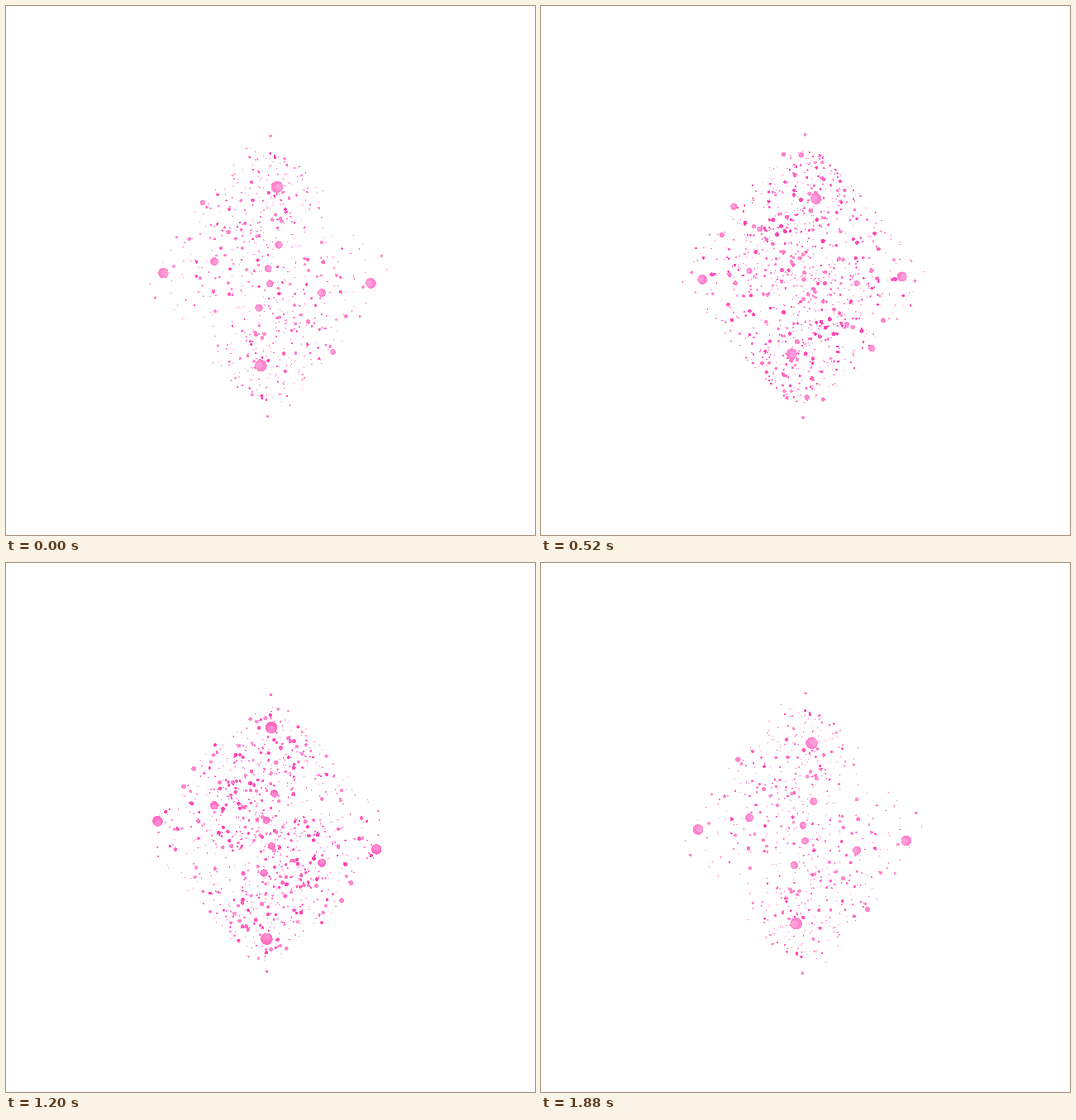
Animation, 640 px wide and 640 px high, one loop 1.92 s. Source, as an HTML page with a canvas:

```html
<!DOCTYPE html>
<html lang="en">
<head>
<meta charset="utf-8">
<title>Pink dust diamond</title>
<style>
  html, body { margin: 0; width: 100%; height: 100%; overflow: hidden; background: #fff; }
  canvas { display: block; width: 640px; height: 640px; }
</style>
</head>
<body>
<canvas id="stage" width="640" height="640"></canvas>
<script>
const ctx = document.getElementById('stage').getContext('2d');
const LOOP = 1920, STEP = 40, TAU = Math.PI * 2;
const CX = 317.4, CY = 327.6;
const LIGHT = [255, 143, 209], DEEP = [255, 66, 178], PALE = [255, 166, 222];

// A ball glides from one point to another, swelling and shrinking on the way.
// A life may run past the end of the loop, so two lives can overlap.
const ball = (birth, life, from, to, size) => ({ birth, life, from, to, size });
const balls = [
  ball(1740, 1760, [326, 254], [327, 238], 3),
  ball(1700, 1800, [223, 284], [213, 267], 3),
  ball(1700, 1600, [271, 275], [257, 264], 3.4),
  ball(760, 2240, [321, 161], [319, 154], 1.8),
  ball(400, 2200, [313, 304], [319, 324], 4.4),
  ball(640, 1780, [320, 271], [334, 296], 4.6),
  ball(1700, 1560, [240, 236], [226, 250], 4.2),
  ball(600, 2040, [252, 280], [252, 325], 5),
  ball(640, 2280, [178, 304], [200, 338], 6.3),
  ball(440, 2460, [314, 178], [337, 246], 7.2)
];

let seed = 20417;
function rand() {
  seed = (seed + 0x6D2B79F5) | 0;
  let n = Math.imul(seed ^ (seed >>> 15), 1 | seed);
  n = (n + Math.imul(n ^ (n >>> 7), 61 | n)) ^ n;
  return ((n ^ (n >>> 14)) >>> 0) / 4294967296;
}

const hump = (x, y, mx, my, s) => Math.exp(-((x - mx) ** 2 + (y - my) ** 2) / (2 * s * s));

// Upper half of the cloud; the lower half is its mirror through the centre.
function density(x, y) {
  const ax = Math.abs(x), ay = Math.abs(y);
  if (ax / 154 + ay / 168 > 1.04 || ay > 150) return 0;
  const band = .14 + .42 * Math.exp(-((x / 70) ** 2));
  const clumps = .22 * hump(x, y, 0, 0, 40) + .32 * hump(x, y, 46, -92, 24)
    + .22 * hump(x, y, -55, -58, 30);
  return (band + clumps) * (1 - .65 * hump(x, y, 60, -45, 20));
}

function makeMote() {
  let x, y;
  do {
    x = (rand() * 2 - 1) * 158;
    y = -rand() * 160;
  } while (rand() > density(x, y));
  const inward = rand() < (Math.abs(x) > 70 ? .15 : .5);
  return {
    x, y,
    vx: inward ? -.045 * x - .06 * y : .075 * x,
    vy: inward ? -.075 * x - .165 * y : .06 * x + .1 * y,
    size: .6 + 1.8 * rand() ** 2.6,
    peak: rand() < .45 ? .42 + (rand() - .5) * .4 : rand(),
    tone: rand() * TAU,
    turns: 1 + Math.floor(rand() * 3)
  };
}
const motes = Array.from({ length: 690 }, makeMote);

const lerp = (a, b, k) => a + (b - a) * k;
const mix = (a, b, k) => `rgb(${a.map((v, i) => Math.round(lerp(v, b[i], k)))})`;

// Hard-edged disc built from pixel rows.
function disc(x, y, r, color) {
  ctx.fillStyle = color;
  if (r < .65) {
    ctx.fillRect(Math.floor(x), Math.floor(y), 1, 1);
    return;
  }
  for (let row = Math.floor(y - r); row <= y + r; row++) {
    const h = row + .5 - y;
    if (Math.abs(h) >= r) continue;
    const w = Math.sqrt(r * r - h * h);
    const left = Math.round(x - w);
    ctx.fillRect(left, row, Math.round(x + w) - left, 1);
  }
}

function shadedDisc(x, y, r, deep, turn) {
  disc(x, y, r, mix(LIGHT, DEEP, deep));
  if (r < 3.4) return;
  const ox = Math.cos(turn) * r * .3, oy = Math.sin(turn) * r * .3;
  disc(x + ox, y + oy, r * .6, mix(PALE, DEEP, deep * .7));
}

function drawBall(b, t) {
  const k = (t - b.birth) / b.life;
  if (k <= 0 || k >= 1) return;
  const x = lerp(b.from[0], b.to[0], k), y = lerp(b.from[1], b.to[1], k);
  const r = b.size * Math.min(1, 1.15 * Math.sin(k * Math.PI) ** .4);
  const deep = .12 + .8 * Math.max(0, Math.cos((t - 1400) / 1360 * TAU)) ** 2;
  const turn = t / LOOP * TAU * 2;
  // The mirror centre leans slightly for balls far from the axis.
  const lean = Math.abs(x - CX) * .019;
  shadedDisc(x, y, r, deep, turn);
  shadedDisc(2 * (318.3 - lean) - x, 2 * (326.8 + lean) - y, r, deep, turn + Math.PI);
}

function drawMote(m, u) {
  const age = ((u - m.peak + 1.5) % 1) - .5;
  const r = m.size * Math.min(1.1, .68 + .95 * Math.cos(age * TAU));
  if (r < .3) return;
  const x = m.x + m.vx * age, y = m.y + m.vy * age;
  const color = mix(LIGHT, DEEP, .5 + .5 * Math.sin(m.tone + m.turns * u * TAU));
  disc(CX + x, CY + y, r, color);
  disc(CX - x, CY - y, r, color);
}

function draw(t) {
  ctx.fillStyle = '#fff';
  ctx.fillRect(0, 0, 640, 640);
  for (const m of motes) drawMote(m, t / LOOP);
  for (const b of balls) {
    drawBall(b, t);
    drawBall(b, t + LOOP);
  }
}

const start = performance.now();
function tick() {
  const t = (performance.now() - start) % LOOP;
  draw(Math.floor(t / STEP) * STEP);
  requestAnimationFrame(tick);
}
tick();
</script>
</body>
</html>
```
